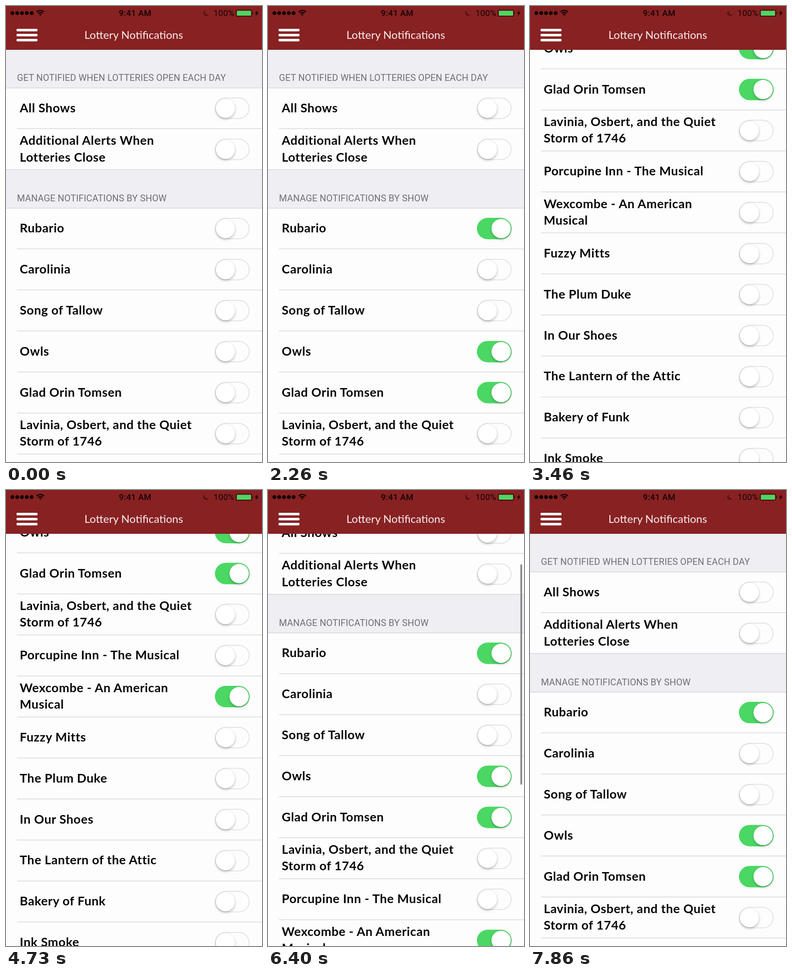
Animation of 560x999 px, one loop 7920 ms. Source, as an HTML page:

```html
<!DOCTYPE html>
<html lang="en">
<head>
<meta charset="utf-8">
<title>Lottery Notifications</title>
<style>
  @property --scroll { syntax: "<number>"; inherits: true; initial-value: 0; }
  @property --on { syntax: "<number>"; inherits: true; initial-value: 0; }

  html, body { margin: 0; width: 100%; height: 100%; overflow: hidden; background: #eeeef3; }
  svg { display: block; width: 560px; height: 999px; animation: scroll 7920ms infinite; }

  #list { transform: translateY(calc(var(--scroll) * -1px)); }
  .panel { fill: #fdfdfd; }
  .line { fill: #cfced2; }
  .label { font: 700 27px Lato, sans-serif; letter-spacing: .6px; fill: #060606; }
  .section { font: 400 20px Roboto, sans-serif; letter-spacing: .15px; fill: #6f6f74; }
  .title { font: 400 24px Lato, sans-serif; fill: #f8eeee; text-anchor: middle; }
  .status { font: 500 18.3px Roboto, sans-serif; letter-spacing: .35px; fill: #140304; }
  .charge { font-weight: 400; }

  .track { fill: color-mix(in srgb, #4bd763 calc(var(--on) * 100%), #e3e3e5); }
  .hollow { fill: #fdfdfd; transform: scale(calc(1 - var(--on))); }
  .knob {
    fill: #fff; stroke: rgba(0, 0, 0, .09); stroke-width: .8px;
    transform: translateX(calc(var(--on) * 30px - 15px));
    filter: drop-shadow(0 3px 2.5px rgba(0, 0, 0, .22));
  }

  #thumb {
    y: calc(100px + max(0, var(--scroll)) * .484px);
    height: calc(483px + min(0, var(--scroll)) * 1px);
    fill: #8c8c8f;
    animation: thumb 7920ms linear infinite;
  }

  @keyframes scroll {
    0% { --scroll: 0; }
    29.42% { --scroll: 0; animation-timing-function: cubic-bezier(.33, .45, .67, .85); }
    36.11% { --scroll: 559; animation-timing-function: cubic-bezier(.33, .66, .66, 1); }
    40.4% { --scroll: 664; }
    74.87% { --scroll: 664; animation-timing-function: linear; }
    75.76% { --scroll: 631; animation-timing-function: cubic-bezier(.3, .25, .65, .85); }
    82.83% { --scroll: 0; animation-timing-function: ease-out; }
    84.22% { --scroll: -65; animation-timing-function: ease-in-out; }
    85.86% { --scroll: -31; animation-timing-function: ease-out; }
    89.02%, 100% { --scroll: 0; }
  }
  @keyframes thumb {
    0%, 29.4% { opacity: 0; }
    30.2%, 40.4% { opacity: 1; }
    43%, 74.7% { opacity: 0; }
    75.5%, 90.5% { opacity: 1; }
    93.4%, 100% { opacity: 0; }
  }
</style>
</head>
<body>
<svg viewBox="0 0 560 999">
  <rect width="560" height="999" fill="#eeeef3"/>
  <g id="list">
    <rect class="panel" y="180" width="560" height="178"/>
    <rect class="panel" y="443" width="560" height="1440"/>
    <rect class="line" y="179" width="560" height="1.2"/>
    <rect class="line" x="24" y="268" width="536" height="1.2"/>
    <rect class="line" y="357.8" width="560" height="1.2"/>
    <rect class="line" y="442.4" width="560" height="1.2"/>
    <text class="section" x="24" y="164">GET NOTIFIED WHEN LOTTERIES OPEN EACH DAY</text>
    <text class="section" x="24" y="428">MANAGE NOTIFICATIONS BY SHOW</text>
  </g>
  <rect id="thumb" x="552" width="4" rx="2"/>

  <rect width="560" height="96" fill="#882122"/>
  <g fill="#fff">
    <rect x="23" y="50" width="46" height="5.5" rx="2"/>
    <rect x="23" y="61" width="46" height="5.5" rx="2"/>
    <rect x="23" y="72" width="46" height="5.5" rx="2"/>
  </g>
  <text class="title" x="279.5" y="72">Lottery Notifications</text>

  <path d="M14 15.5H57" stroke="#140304" stroke-width="8.6" stroke-linecap="round" stroke-dasharray="0 10.5"/>
  <g fill="none" stroke="#140304" stroke-width="2.5">
    <path d="M67 13a11.5 11.5 0 0 1 16 0M70 16.4a7.2 7.2 0 0 1 10 0"/>
    <path d="M75 21.5l-2.6-2.8a3.7 3.7 0 0 1 5.2 0z" fill="#140304" stroke="none"/>
  </g>
  <text class="status" x="247" y="22">9:41 AM</text>
  <path d="M435 9.5a6.5 6.5 0 1 0 8.5 9a7 7 0 0 1-8.5-9z" fill="#5c1315"/>
  <text class="status charge" x="454" y="22">100%</text>
  <rect x="503.5" y="9" width="34" height="13.5" rx="2.5" fill="none" stroke="#140304" stroke-width="1.2"/>
  <rect x="505" y="10.5" width="31" height="10.5" rx="1" fill="#4bd763"/>
  <path d="M539 13.2q2.2 2.5 0 5z" fill="#140304"/>
  <path d="M550.5 9l-6 7.5h3.6l-2 6 6.4-8h-3.7z" fill="#140304"/>
</svg>
<script>
  const LOOP = 7920, FLIP = 280, ROW = 89.85;
  const list = document.getElementById('list');
  const style = document.head.appendChild(document.createElement('style'));
  const percent = ms => (ms / LOOP * 100).toFixed(3) + '%';

  // Each show: its lines of text, and the time its switch is tapped, if any.
  const shows = [
    ['Rubario', 710],
    ['Carolinia'],
    ['Song of Tallow'],
    ['Owls', 1240],
    ['Glad Orin Tomsen', 1740],
    ['Lavinia, Osbert, and the Quiet|Storm of 1746'],
    ['Porcupine Inn - The Musical'],
    ['Wexcombe - An American|Musical', 3900],
    ['Fuzzy Mitts'],
    ['The Plum Duke'],
    ['In Our Shoes'],
    ['The Lantern of the Attic'],
    ['Bakery of Funk', 5000],
    ['Ink Smoke']
  ];

  function add(markup) {
    list.insertAdjacentHTML('beforeend', markup);
  }

  function addRow(text, middle, tap) {
    const lines = text.split('|');
    const first = middle + (lines.length > 1 ? -10 : 8.5);
    lines.forEach((line, i) =>
      add(`<text class="label" x="30" y="${first + i * 36.5}">${line}</text>`));

    let motion = '';
    if (tap) {
      const name = 'flip' + tap;
      style.textContent += `@keyframes ${name} {
        0% { --on: 0 }
        ${percent(tap)} { --on: 0; animation-timing-function: ease-in-out }
        ${percent(tap + FLIP)}, 100% { --on: 1 }
      }`;
      motion = `style="animation: ${name} ${LOOP}ms infinite"`;
    }
    add(`<g transform="translate(495 ${middle})" ${motion}>
      <rect class="track" x="-38" y="-23.5" width="76" height="47" rx="23.5"/>
      <rect class="hollow" x="-36" y="-21.5" width="72" height="43" rx="21.5"/>
      <circle class="knob" r="21.2"/>
    </g>`);
  }

  addRow('All Shows', 224);
  addRow('Additional Alerts When|Lotteries Close', 314);
  shows.forEach(([text, tap], i) => {
    addRow(text, 487.6 + i * ROW, tap);
    add(`<rect class="line" x="24" y="${441.8 + (i + 1) * ROW}" width="536" height="1.2"/>`);
  });
</script>
</body>
</html>
```
